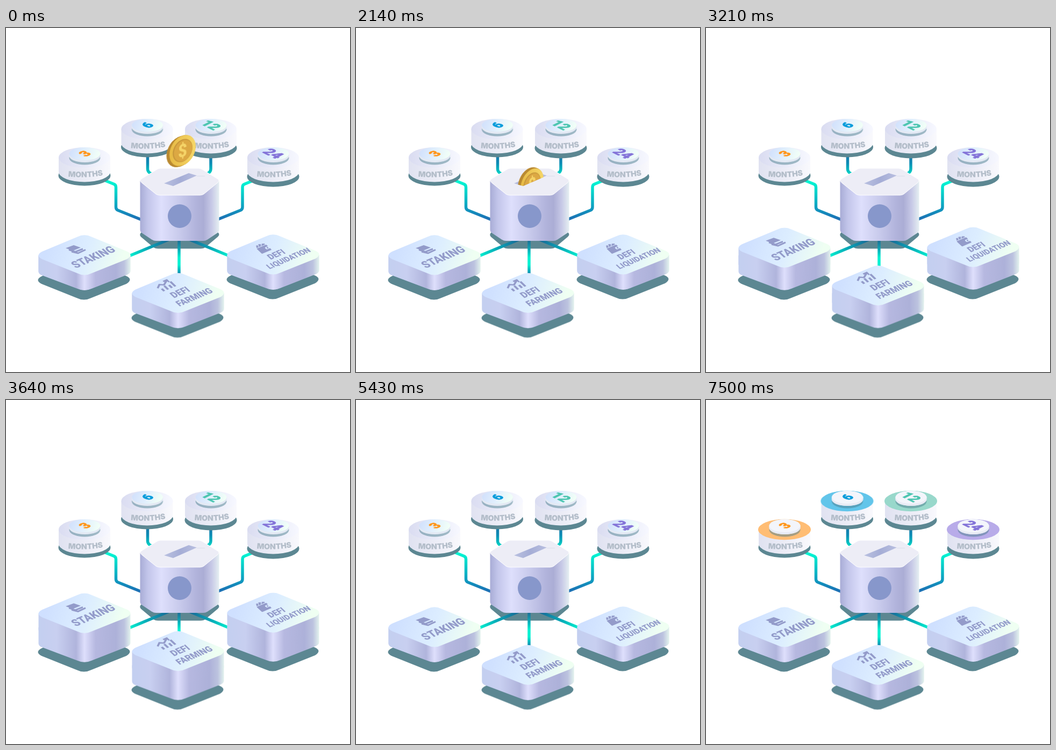
An HTML page for the animation above (8 s loop, 640 by 640 pixels).

```html
<!DOCTYPE html>
<html lang="en">
<head>
<meta charset="utf-8">
<title>Staking hub</title>
<style>
html, body { margin: 0; width: 100%; height: 100%; overflow: hidden; background: #fff; }
svg { display: block; width: 100vw; height: 100vh; }
text { font-family: Roboto, Inter, sans-serif; font-weight: 900; text-anchor: middle; }
.shade { fill: #5c8792; }
.ink { fill: #939bca; }
.months { font-family: Inter, Roboto, sans-serif; font-size: 14.2px; fill: #b3bdc9; }
.wire { fill: none; stroke-width: 5.5; }

.lift, .drop, .turn, .tint, .pulse { animation: 8s linear infinite; }

.lift { animation-name: lift; }
@keyframes lift {
  0%, 29.5% { transform: none; animation-timing-function: cubic-bezier(.42, 0, .8, .85); }
  46.4% { transform: translateY(-27px); }
  60.9% { transform: translateY(-27px); animation-timing-function: ease-in-out; }
  67.5%, 100% { transform: none; }
}

.drop { animation-name: drop; }
@keyframes drop {
  0%, 21.5% { transform: none; visibility: visible; animation-timing-function: cubic-bezier(.333, 0, .667, .333); }
  28.7% { transform: translateY(114px); visibility: hidden; }
  100% { transform: translateY(114px); visibility: hidden; }
}

/* --k runs from the face (0) to the back (1) */
.turn { animation-name: turn; }
@keyframes turn {
  0% { transform: translate(calc(var(--k) * -5.5px), calc(var(--k) * 2px)) matrix(.875, -.285, 0, .993, 328.5, 228); }
  26.75%, 100% { transform: translate(calc(var(--k) * -5px), calc(var(--k) * -2px)) matrix(.77, -.32, 0, .99, 327.5, 229.5); }
}

.tint { animation-name: tint; }
@keyframes tint {
  0%, 84.2% { opacity: 0; }
  93.7%, 100% { opacity: 1; }
}

.pulse { opacity: 0; }
.rise { animation-name: rise; }
.join { animation-name: join; }
.bend { animation-name: bend; }
.climb { animation-name: climb; }
@keyframes rise {
  0%, 67.8% { transform: translate(322px, 485px); opacity: 0; }
  67.9% { transform: translate(322px, 485px); opacity: 1; }
  72.3% { transform: translate(322px, 383px); opacity: 1; }
  72.4%, 100% { transform: translate(322px, 383px); opacity: 0; }
}
@keyframes join {
  0%, 67.8% { transform: translate(195px, 440px); opacity: 0; }
  67.9% { transform: translate(195px, 440px); opacity: 1; }
  72.3% { transform: translate(325px, 385px); opacity: 1; }
  72.4%, 100% { transform: translate(325px, 385px); opacity: 0; }
}
@keyframes bend {
  0%, 73.2% { transform: translate(280px, 367px); opacity: 0; }
  73.3% { transform: translate(280px, 367px); opacity: 1; }
  78.4% { transform: translate(208px, 339px); opacity: 1; }
  81.2% { transform: translate(207px, 312px); opacity: 1; }
  84.2% { transform: translate(207px, 311px); opacity: 1; }
  84.8%, 100% { transform: translate(207px, 311px); opacity: 0; }
}
@keyframes climb {
  0%, 73.2% { transform: translate(292px, 291px); opacity: 0; }
  73.3% { transform: translate(292px, 291px); opacity: 1; }
  81.2% { transform: translate(277px, 273px); opacity: 1; }
  84.2% { transform: translate(271px, 267px); opacity: 1; }
  84.8%, 100% { transform: translate(271px, 267px); opacity: 0; }
}
</style>
</head>
<body>
<svg id="stage" viewBox="0 0 640 640"></svg>
<script>
const flip = 'transform="translate(644.5 0) scale(-1 1)"';
const slant = 'matrix(.9 -.385 .78 .74 0 0)';

const gradient = (id, [x1, y1, x2, y2], ...stops) =>
  `<linearGradient id="${id}" gradientUnits="userSpaceOnUse" x1="${x1}" y1="${y1}" x2="${x2}" y2="${y2}">` +
  stops.map(([at, color]) => `<stop offset="${at}" stop-color="${color}"/>`).join('') +
  '</linearGradient>';

const defs = `<defs>
  ${gradient('slab', [60, 0, 232, 0], [0, '#c3cff0'], [.2, '#c8cff0'], [.41, '#b0b4dc'], [.5, '#dedffc'],
    [.62, '#b6b8e0'], [.84, '#adb1d9'], [.93, '#bcc3df'], [1, '#e4f4ee'])}
  ${gradient('lid', [80, 400, 212, 445], [0, '#cfe0ff'], [.5, '#dcedff'], [1, '#effff2'])}
  ${gradient('hex', [249, 0, 397, 0], [0, '#a7abd5'], [.1, '#c2c5ea'], [.27, '#dedffc'], [.48, '#cacced'],
    [.7, '#b2b4dc'], [.8, '#abadd5'], [.9, '#c6c8e6'], [1, '#e6f0f2'])}
  ${gradient('slot', [294, 0, 355, 0], [0, '#b9c0e0'], [.5, '#a5add6'], [1, '#b9bfe0'])}
  ${gradient('drum', [98, 0, 194, 0], [0, '#e0e2f1'], [.5, '#ebecf6'], [1, '#f9f9fd'])}
  ${gradient('deck', [98, 0, 194, 0], [0, '#dadcf1'], [.5, '#e8eaf8'], [1, '#f7f8ff'])}
  ${gradient('knob', [122, 226, 170, 244], [0, '#d3e2fc'], [.5, '#e2f0fd'], [1, '#f1fff7'])}
  ${gradient('sideWire', [0, 356, 0, 286], [0, '#1c6fb4'], [.3, '#0f9cc0'], [1, '#00f5d2'])}
  ${gradient('topWire', [0, 233, 0, 270], [0, '#1a73a8'], [.5, '#0f8cb5'], [1, '#00cfc4'])}
  ${gradient('lowWire', [297, 396, 232, 423], [0, '#15709a'], [.5, '#0aa6b6'], [1, '#00ecce'])}
  ${gradient('midWire', [0, 396, 0, 458], [0, '#1a6f96'], [.3, '#0cb5bd'], [.5, '#00f2d2'], [.72, '#00f2d2'], [1, '#1383ad'])}
  ${gradient('gold', [-28, 0, 28, 0], [0, '#e6b944'], [1, '#f6d768'])}
  <radialGradient id="glow">
    <stop offset="0" stop-color="#00aeff"/><stop offset=".4" stop-color="#00bdff"/>
    <stop offset=".5" stop-color="#12dfe8"/><stop offset=".78" stop-color="#22e4dc"/>
    <stop offset=".84" stop-color="#7fe6da"/><stop offset="1" stop-color="#b4f3ea" stop-opacity=".7"/>
  </radialGradient>
  <path id="arc" d="M108 275.500Q148 281 188 272.500"/>
  <path id="diamond" d="M133 388.5Q146 382 159 388.5L225 415.5Q238 421.5 225 430L160 456Q146 463 132 456L67 430Q54 423 67 416Z"/>
  <path id="block" d="M60.5 423V453Q60.5 457.5 67 460L132 484.5Q146 491 160 484.5L225 459Q231.5 456 231.5 452V423L146 400Z"/>
  <clipPath id="mouth"><path d="M250 150H400V262L355 275L311 294L294 289.5L250 275Z"/></clipPath>
</defs>`;

const label = (word, x, y, size) =>
  `<text class="ink" transform="translate(${x} ${y}) ${slant}" font-size="${size}" y="${size * .355}">${word}</text>`;

const icons = {
  layers: `<path d="M-18-1L-3-6.500L10-2L-5 4Z"/>
    <path d="M-12 3L0 7L14 1.500M-7 6.500L5 9.500L19 3" transform="translate(0 -1)" fill="none" stroke="#939bca" stroke-width="3"/>`,
  chart: `<g transform="${slant}">
    <path d="M-14 2h4v6h-4zM-6-1h4v9h-4zM2 1h4v7h-4zM9-4h4v12h-4z"/>
    <path d="M-17-2L-9-7L-3-3L8-9M1-9.500H8.500V-4" fill="none" stroke="#939bca" stroke-width="3"/></g>`,
  wallet: `<g transform="${slant}">
    <path d="M-10-2Q-10-3-9-3H9Q10-3 10-2V1H5Q3 1 3 3.500T5 6H10V9Q10 10 9 10H-9Q-10 10-10 9Z"/>
    <circle cx="7" cy="3.500" r="1.500"/><path d="M-9-4L-6-9L-3-8L-5-4ZM-4-4L-1-9.500L3-8L0-4ZM1-4L5-8L9-6L8-4Z"/></g>`
};

const tile = (dx, dy, icon, [ix, iy], words) => `
  <g transform="translate(${dx} ${dy})">
    <use href="#diamond" class="shade" x="-1" y="46"/>
    <use href="#block" fill="url(#slab)"/>
    <g class="lift">
      <use href="#block" fill="url(#slab)"/>
      <use href="#diamond" fill="url(#lid)"/>
      <g transform="translate(${-dx} ${-dy})">
        <g class="ink" transform="translate(${ix} ${iy})">${icons[icon]}</g>
        ${words.map(w => label(...w)).join('')}
      </g>
    </g>
  </g>`;

const readUp = '.85 -.4 .85 .4';
const readDown = '.8 .4 -.8 .4';
const knobSide = 'M117.500 234V238A29 12 0 0 0 175.500 238V234Z';
const disc = (dx, dy, drop, number, color, tint, size, axes) => `
  <g transform="translate(${dx} ${dy})">
    <ellipse class="shade" cx="146" cy="${274.5 + drop}" rx="48.500" ry="19"/>
    <path fill="url(#drum)" d="M98 241V267.500A48 19 0 0 0 194 267.500V241Z"/>
    <ellipse cx="146" cy="241" rx="48" ry="19" fill="url(#deck)"/>
    <g class="tint"><ellipse cx="146" cy="241" rx="49" ry="19.200" fill="${tint}"/></g>
    <ellipse cx="146.500" cy="242" rx="29" ry="12.500" fill="#4e8090" opacity=".5"/>
    <path d="${knobSide}" fill="#e3e9f4"/>
    <ellipse cx="146.500" cy="234" rx="29" ry="12" fill="url(#knob)"/>
    <g class="tint">
      <path d="${knobSide}" fill="#e8ebf4"/>
      <ellipse cx="146.500" cy="234" rx="29" ry="12" fill="#f3f5fb"/>
    </g>
    <text transform="translate(146.500 233.500) matrix(${axes} 0 0)" font-size="${size}" y="${size * .355}"
      fill="${color}" stroke="${color}" stroke-width=".8">${number}</text>
    <text class="months"><textPath href="#arc" startOffset="50%">MONTHS</textPath></text>
  </g>`;

const pulse = kind =>
  `<g class="pulse ${kind}"><ellipse rx="26" ry="9" fill="url(#glow)"/></g>`;

const half = `
  <path class="wire" stroke="url(#sideWire)" d="M254 357.500L208 339Q204.500 337.500 204.500 333V296Q204.500 292 201 290.500L174 279.500"/>
  <path class="wire" stroke="url(#topWire)" d="M263.500 228V262Q263.500 267 268 270L274 273"/>
  <path class="wire" stroke="url(#lowWire)" d="M302 394L222 427"/>`;

const halfPulses = pulse('join') + pulse('bend') + pulse('climb');

const box = `
  <path fill="url(#hex)" d="M249.500 284V375Q249.500 379 253 381.500L271 393.500Q275 396 279 396H367Q371 396 375 393.500L393 381.500Q396.500 379 396.500 375V284Z"/>
  <path fill="#ededf6" stroke="#fff" stroke-width="1"
    d="M251.500 281L281 263Q284 261 288 261H358Q362 261 365 263L394 281Q398 284 394 287.500L368 309Q365 311 361 311H286Q282 311 279 309L252 287.500Q248 284 251.500 281Z"/>
  <path fill="url(#slot)" d="M294 289L340 270L355 274.500L311 294Z"/>
  <path stroke="#dcdeec" d="M355 275.500H370"/>
  <circle cx="323" cy="350" r="22" fill="#8797cb"/>`;

const edges = [1, .8, .6, .4, .2].map(k =>
  `<circle class="turn" style="--k:${k}" r="28" fill="#b98930"/>`).join('');
const coin = `
  <g clip-path="url(#mouth)"><g class="drop">
    ${edges}
    <g class="turn" style="--k:0">
      <circle r="28" fill="url(#gold)"/>
      <circle r="21" fill="#c6963a"/>
      <circle cx="1" cy=".5" r="19.500" fill="#dca843"/>
      <text font-size="33" y="11.500" fill="#f5d468">$</text>
    </g>
  </g></g>`;

document.getElementById('stage').innerHTML = `${defs}
  <path class="shade" d="M252 380L275 372H371L394 380Q399 384 394 388.500L372 407Q368 410.500 362 410.500H283Q277 410.500 273 407L251 388.500Q247 384 252 380Z"/>
  ${half}<g ${flip}>${half}</g>
  <path class="wire" stroke="url(#midWire)" d="M322 392V470"/>
  ${halfPulses}<g ${flip}>${halfPulses}</g>${pulse('rise')}
  ${disc(0, 0, 0, '3', '#ff971c', '#ffbd74', 25, readUp)}
  ${disc(116.5, -53, 0, '6', '#0a9ddb', '#62c5ea', 25, readUp)}
  ${disc(235, -53, 2, '12', '#4cc5b0', '#98d8cb', 28, readDown)}
  ${disc(351, 0, 2, '24', '#8474d8', '#b8abe9', 29, readDown)}
  ${box}
  ${tile(0, 0, 'layers', [129, 410.5], [['STAKING', 162, 426, 20]])}
  ${tile(351, -1, 'wallet', [477.5, 409], [['DEFI', 502.5, 421, 15.6], ['LIQUIDATION', 525.5, 428.5, 14.2]])}
  ${tile(174, 70.5, 'chart', [299, 479], [['DEFI', 323.5, 491.5, 17], ['FARMING', 350, 500.5, 16.2]])}
  ${coin}`;
</script>
</body>
</html>
```
